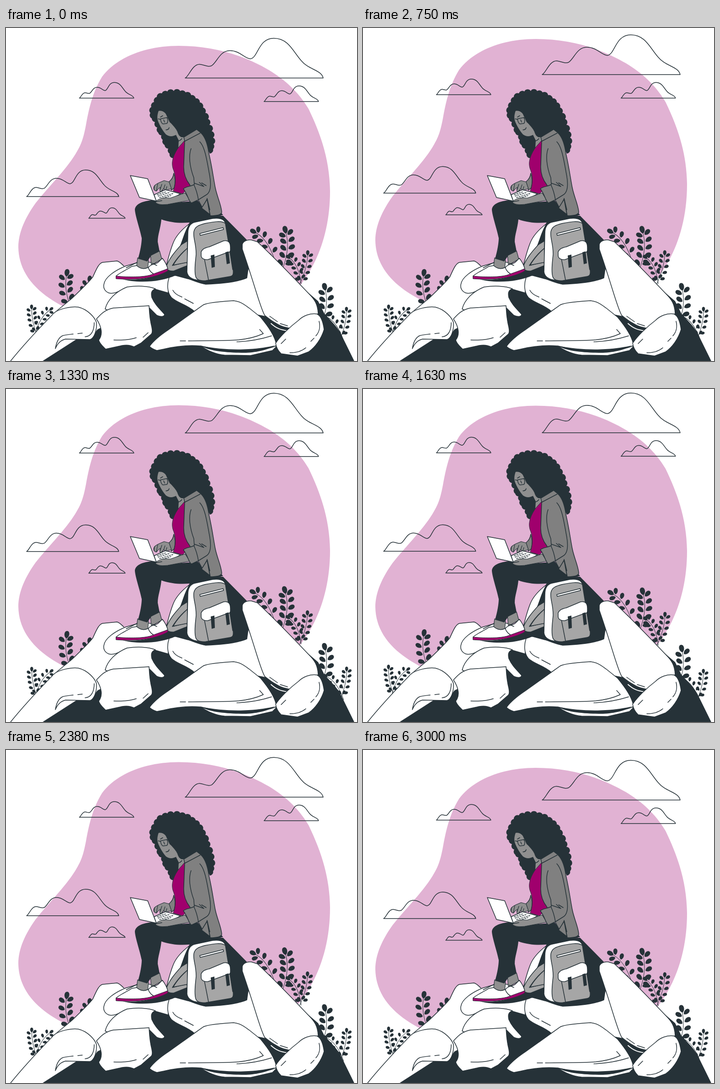
Recreate the animation shown at these times as an HTML page. Size 768 px wide and 729 px high, loop 3040 ms.

```html
<!DOCTYPE html>
<html lang="en">
<head>
<meta charset="utf-8">
<title>Working on a hilltop</title>
<style>
  html, body { margin: 0; width: 100%; height: 100%; overflow: hidden; background: #fff; }
  svg { display: block; width: 100%; height: 100%; stroke-linecap: round; stroke-linejoin: round; }
  .line { fill: none; stroke: #263238; stroke-width: 1.5; }
  .white { fill: #fff; stroke: #263238; stroke-width: 1.5; }
  .jacket { fill: #808080; stroke: #263238; stroke-width: 1.5; }
  .skin { fill: #8f8f8f; stroke: #263238; stroke-width: 1.2; }
  .bag { fill: #a6a6a6; stroke: #263238; stroke-width: 1.5; }
  .dark { fill: #263238; }
  .pink { fill: #a0006d; }
</style>
</head>
<body>
<svg viewBox="0 0 768 729">
  <path id="blob" fill="#e1b2d3" d="M378 39C300 39 238 68 210 107C188 143 181 180 175 212C170 238 166 252 156 269C135 307 95 345 65 383C42 415 27 448 27 480C28 540 70 582 130 612L400 640L610 600C665 550 709 470 709 357C708 290 690 235 662 177C640 140 610 113 575 92C520 60 455 39 378 39Z"/>
  <g id="clouds" class="line"></g>
  <g id="plants"></g>

  <g id="hill">
    <path class="dark" d="M80 729L320 575L360 540L395 470L402 425Q440 410 475 411L533 470L683 598L697 626C715 645 725 655 732 668L762 729Z"/>
    <path class="white" stroke="none" d="M10 729C35 698 70 660 104 625L143 593C165 572 180 558 190 545C197 530 203 514 212 513L243 510C250 512 254 518 258 521L300 540L240 640L200 660L184 682L130 681C118 684 112 692 108 702L80 729Z" style="stroke:none"/>
    <path class="line" d="M10 729C35 698 70 660 104 625L143 593C165 572 180 558 190 545C197 530 203 514 212 513L243 510C250 512 254 518 258 521"/>
    <path class="white" d="M214 562C216 545 240 530 262 521L300 510L350 520L385 530L370 541C358 546 354 560 355 580L327 572C310 564 280 566 262 569C250 576 235 583 225 580C215 576 213 568 214 562Z"/>
    <path class="white" d="M217 615C222 595 240 577 265 567C285 564 310 564 327 571C318 574 317 580 319 590C327 608 338 616 347 627C346 633 336 632 330 629L313 612L260 640Z"/>
    <path class="white" d="M198 637C206 628 215 617 235 613L313 608C314 625 314 635 319 655C321 665 320 668 318 670L295 690L280 698C272 694 262 693 250 696L218 703C212 697 204 690 203 683C212 672 210 655 198 637Z"/>
    <path class="line" d="M236 683C255 684 272 682 285 678M311 667L300 677"/>
    <path class="white" d="M104 624C115 614 145 609 158 611C180 616 195 635 198 645C199 660 194 678 184 682L130 681C118 684 112 692 108 702C109 690 114 679 123 675C112 676 96 650 104 624Z" style="stroke:none"/>
    <path class="line" d="M104 625C115 614 145 609 158 611C180 616 195 635 198 645C199 660 194 678 184 682L130 681C118 684 112 692 108 702C110 689 114 679 123 674C131 671 139 671 147 670M157 669L167 668M193 645C193 662 187 675 173 676"/>
    <path class="white" d="M357 546C352 560 352 578 362 590C375 602 395 605 412 620L432 606L560 630L578 634L530 525L527 547C505 557 460 560 437 561C420 558 404 550 398 549L372 542Q362 541 357 546Z"/>
    <path class="line" d="M365 574C369 582 377 586 385 589M391 593L410 603"/>
    <path class="white" d="M425 695C440 706 460 715 478 716L535 717L583 706L592 697L560 690Z"/>
    <path class="white" d="M314 697C325 682 340 671 355 661L432 606C445 600 480 598 498 597C512 598 522 606 532 613L557 633C575 655 589 675 592 695C575 704 545 706 520 707C485 706 450 703 425 696C400 694 370 697 345 703L330 706C324 704 318 701 314 697Z"/>
    <path class="dark" d="M425 695C460 703 500 705 530 703C555 702 575 698 588 695C575 704 550 710 525 711C485 711 445 708 425 695Z"/>
    <path class="line" d="M381 685L393 685M399 685C440 684 480 685 505 683C530 681 548 676 563 669L555 660M505 687C535 686 562 680 581 674"/>
    <path class="white" d="M517 474C519 466 529 463 537 464L550 468C600 515 640 558 662 581C675 594 682 604 683 625L640 660C629 665 617 658 610 656C592 649 580 640 566 629C556 612 546 568 517 484Z"/>
    <path class="dark" d="M565 629C582 645 600 653 624 657L611 673C595 662 577 651 565 629Z"/>
    <path d="M580 647C592 658 602 661 617 663" fill="none" stroke="#fff" stroke-width="2"/>
    <path class="line" d="M577 631L594 643M600 647L616 652"/>
    <path class="white" d="M590 690C600 675 620 655 640 640C650 630 665 624 680 626C690 630 694 645 696 660C690 680 677 699 662 709L638 718L602 713C595 706 591 698 590 690Z"/>
    <path class="line" d="M685 642C688 653 686 665 678 674M674 679L667 686M621 711C636 711 648 707 656 700M602 691L612 681"/>
  </g>

  <g id="backpack">
    <path class="dark" d="M255 550C290 554 335 545 356 528L400 520L450 545L520 535Q529 541 527 547C505 557 460 560 437 561C420 558 404 550 396 545L372 541C340 557 285 559 255 550Z"/>
    <path class="dark" d="M352 526L402 425L404 530Z"/>
    <path class="white" d="M402 428C386 440 372 455 366 470C360 485 355 503 350 524L375 490C386 473 388 450 402 428Z"/>
    <path class="bag" d="M350 524C356 505 372 487 384 474L397 466L397 482C384 492 374 504 364 520L396 512L397 520L367 532C358 532 351 530 350 524Z"/>
    <path class="bag" d="M366 519C374 504 386 492 397 482L397 513Z"/>
    <path class="white" d="M398 450C398 434 404 427 414 425L452 417C468 415 478 419 480 428L430 553C412 552 398 548 396 534Z"/>
    <path class="bag" d="M411 446C413 434 424 431 435 428C455 424 472 421 480 428L486 465L497 530C498 540 496 543 490 544L437 553C425 554 417 551 415 544C411 530 415 510 416 495C416 470 409 460 411 446Z"/>
    <path class="white" d="M424 450L475 437L476 441L425 454Z"/>
    <path class="line" d="M434 505L443 551M490 491L496 529"/>
    <path class="white" d="M427 490C430 483 436 481 445 479L476 466C487 464 491 470 491 480L491 487C490 492 485 492 480 493L442 507C433 508 427 504 427 498Z"/>
    <path class="dark" d="M448 498L456 496L457 523L450 525ZM480 491L487 489L490 515L483 517Z"/>
  </g>

  <g id="woman">
    <path class="skin" d="M288 503L312 508L310 529L285 526ZM316 495L336 488L341 506L318 519Z"/>
    <path class="dark" d="M282 398C282 384 305 376 330 377L372 382L420 378L432 393L441 374L475 409C462 414 452 413 440 416C420 425 380 433 340 419C338 440 332 452 332 468L336 489L318 498L309 511L289 505C294 488 297 470 297 460C293 440 283 412 282 398Z"/>
    <path class="white" d="M311 525C318 515 327 518 333 513L342 504C347 510 352 520 354 527C340 535 325 541 315 541Z"/>
    <path class="white" d="M241 543C248 536 265 529 275 522L286 520C294 528 304 528 311 524C314 533 320 537 327 541L300 547L250 547Z"/>
    <path class="line" d="M263 525L287 513M330 520L320 515"/>
    <path class="pink" d="M241 543C270 546 300 545 315 541L354 527L354 532C330 546 290 553 241 549Z" stroke="#263238"/>

    <path id="hair" class="dark"/>
    <path class="skin" d="M334 181C331 190 330 197 333 205C337 214 342 224 350 233C358 239 366 237 372 234L378 246L377 263L391 247L388 234L372 218L358 206L346 180Z" style="stroke:none"/>
    <path class="dark" d="M330 183C340 178 350 184 354 196C359 210 369 214 375 227C378 238 385 243 395 236L400 190L360 165Z"/>
    <path class="line" d="M338 199L352 196Q356 204 352 209L343 210Q339 207 338 199M352 197L358 195M345 201L347 206M350 223Q356 223 357 218M338 195L343 192M333 199L338 200M376 248Q382 246 385 242"/>
    <path class="pink" stroke="#263238" d="M377 262L391 246L404 345L386 363L366 357C371 340 372 325 367 312C361 298 363 283 377 262Z"/>
    <path class="jacket" d="M367 318C366 329 360 334 356 337L362 355L368 350C371 338 370 326 367 318Z"/>
    <path class="jacket" d="M391 247L389 239L417 222L426 229C437 240 441 255 444 275C451 305 454 330 458 350C462 370 472 390 472 404C470 409 462 411 447 411L440 374L430 394L421 377L402 343C392 330 388 315 389 300Z"/>
    <path class="line" d="M391 248L425 230M440 373L446 398L430 394"/>
    <path class="dark" d="M428 395L440 377L446 410Z"/>
    <path class="jacket" d="M428 394L440 375L446 408Z"/>
    <path class="white" d="M324 365L349 354L382 363L366 372L329 380Z"/>
    <path class="line" d="M331 365L349 359M333 368L358 360M336 371L367 362M338 374L361 367" stroke-dasharray="3 2.5"/>
    <path class="skin" d="M357 337L346 334C340 337 331 339 325 345C321 351 324 356 329 357C332 354 334 350 338 349C336 353 336 357 339 359L345 352L350 355L362 352Z"/>
    <path class="line" d="M325 345L324 354M332 341L329 356M341 342L337 354M348 343L345 352M352 347L350 354" style="stroke-width:1.2"/>
    <path class="skin" d="M392 361L360 372L343 372C335 374 329 377 327 382C333 388 344 387 354 386L402 377Z"/>
    <path class="line" d="M329 380L341 378" />
    <path class="white" d="M272 323L310 330L329 379L292 371Z"/>
    <path class="jacket" style="stroke:none" d="M405 264C399 280 402 300 408 330L411 342L421 376L437 367C446 361 449 350 447 330C440 290 435 263 424 250Z"/>
    <path class="line" d="M405 264C399 280 402 304 411 328L412 343M424 249C436 261 440 293 446 325C450 350 445 362 437 366L421 376M413 340L433 347L423 338M428 339L438 345"/>
    <path class="jacket" d="M388 352C395 346 402 348 411 343C416 353 419 364 421 376L406 383C399 380 399 366 388 352Z"/>
  </g>
</svg>
<script>
const $ = id => document.getElementById(id);

// Clouds: x, baseline y, scale
const puff = 'M0 0C8-3 16-31 32-30C42-29 50-23 58-27C70-35 76-60 98-60C120-60 130-42 143-42C160-45 160-87 194-87C226-87 236-58 254-38C270-18 298-18 302 0Z';
$('clouds').innerHTML = [[392, 109.5, 1], [160.5, 153.5, .395], [564.5, 161, .395], [45, 369, .668], [181, 416.5, .264]]
  .map(([x, y, s]) => `<path d="${puff}" transform="translate(${x} ${y}) scale(${s})" vector-effect="non-scaling-stroke"/>`).join('');

// Plant: curved stem from root to tip, leaf pairs on both sides
const leaf = (x, y, angle, size) =>
  `<path class="dark" transform="translate(${x} ${y}) rotate(${angle}) scale(${size})" d="M0 0C-.45-.25-.4-1 0-1S.45-.25 0 0"/>`;

function plant([x0, y0, cx, cy, x1, y1, pairs, size]) {
  let out = `<path class="line" style="stroke-width:1" d="M${x0} ${y0}Q${cx} ${cy} ${x1} ${y1}"/>`;
  const mix = (a, b, c, t) => (1 - t) ** 2 * a + 2 * t * (1 - t) * b + t * t * c;
  const slope = (a, b, c, t) => (1 - t) * (b - a) + t * (c - b);
  const heading = t => Math.atan2(slope(x0, cx, x1, t), -slope(y0, cy, y1, t)) * 180 / Math.PI;
  for (let i = 0; i < pairs; i++) {
    for (const side of [-1, 1]) {
      const t = (i + .55 + side * .12) / pairs;
      const angle = heading(t) + side * 56, a = angle * Math.PI / 180;
      const x = mix(x0, cx, x1, t) + 3 * Math.sin(a), y = mix(y0, cy, y1, t) - 3 * Math.cos(a);
      out += leaf(x, y, angle, size);
    }
  }
  return out + leaf(x1, y1, heading(1), size * 1.1);
}

$('plants').innerHTML = [
  [141, 608, 127, 575, 132, 544, 4, 15],
  [165, 585, 176, 575, 181, 556, 2, 13],
  [67, 671, 56, 640, 56, 616, 5, 9.5],
  [64, 671, 72, 635, 95, 618, 5, 9],
  [604, 530, 622, 485, 613, 450, 5, 15.5],
  [588, 508, 573, 463, 548, 449, 4, 14],
  [643, 560, 659, 525, 660, 498, 5, 10.5],
  [646, 560, 641, 520, 622, 505, 5, 10.5],
  [692, 640, 706, 608, 699, 575, 4, 15.5],
  [732, 679, 745, 645, 745, 621, 5, 9.5],
  [738, 683, 725, 645, 703, 633, 5, 9.5]
].map(plant).join('');

// Curly outline: arcs between points from the left curl over the crown to the right curl
const curls = [366,285, 358,275, 355,264, 347,256, 343,245, 340,235, 333,229, 331,218, 326,206, 319,198, 316,186, 318,173, 324,162, 330,151, 341,143, 353,139, 367,138, 381,138, 393,141, 405,147, 415,154, 424,163, 431,174, 436,186, 442,199, 445,212, 450,226, 453,240, 454,254, 453,265, 446,275];
let hair = 'M' + curls.slice(0, 2);
for (let i = 2; i < curls.length; i += 2) hair += `A8 8 0 0 1 ${curls[i]} ${curls[i + 1]}`;
$('hair').setAttribute('d', hair + 'L430 240L390 240L378 262Z');

// Triangle wave 0..1..0
const tri = p => 1 - Math.abs(1 - 2 * (p % 1));
const move = (id, value) => $(id).setAttribute('transform', value);
const start = performance.now();

function draw(now) {
  const t = Math.min(Math.max(0, now - start) % 3040, 3000);
  move('clouds', `translate(0 ${-15 * tri(t / 3000)})`);
  move('blob', `translate(0 ${-15 * tri(t / 1500)})`);
  move('plants', `rotate(${2 * tri(t / 1500 + .25) - 1} 400 575)`);
  requestAnimationFrame(draw);
}
draw(start);
</script>
</body>
</html>
```
